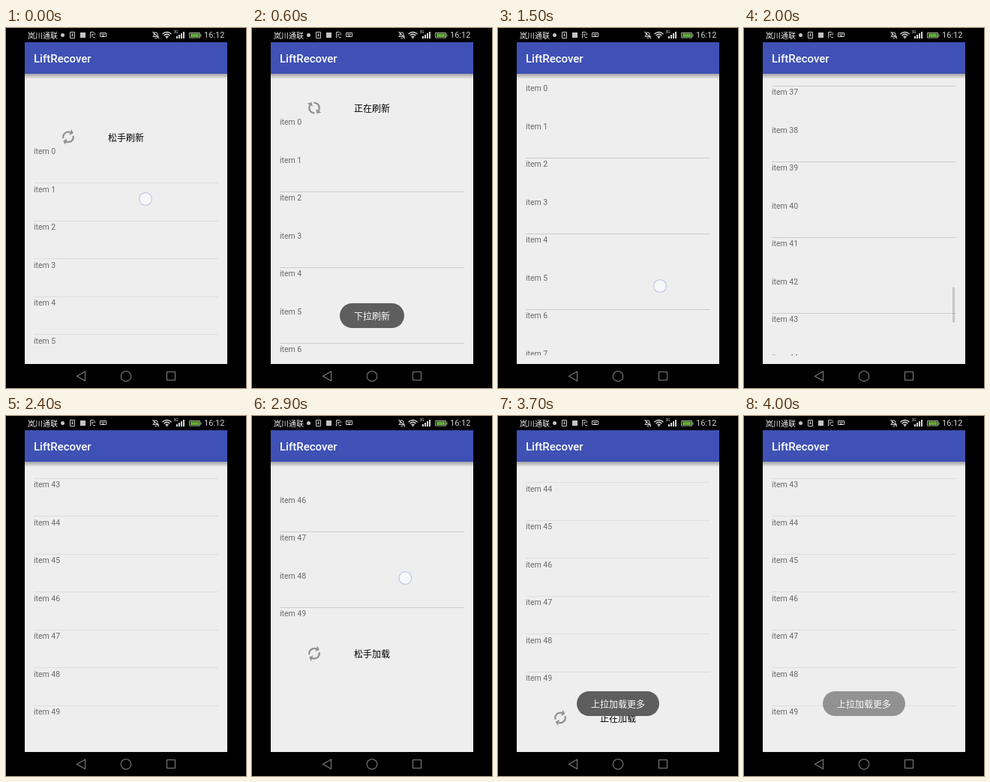
Animation, 320 px wide and 480 px high, one loop 4.1 s. Source, as an HTML page with a canvas:

```html
<!DOCTYPE html>
<html lang="zh-CN">
<head>
<meta charset="utf-8">
<title>Pull list</title>
<style>
html, body { margin: 0; width: 100%; height: 100%; overflow: hidden; background: #000; }
canvas { display: block; }
</style>
</head>
<body>
<canvas id="stage" width="320" height="480"></canvas>
<script>
const ctx = document.getElementById('stage').getContext('2d');
const LOOP = 4100, STEP = 100;
const LATIN = 'Roboto, sans-serif';
const CJK = '"Noto Sans CJK SC", "Noto Sans CJK", sans-serif';

// List geometry in phone pixels; four of them make one stage pixel.
const SCALE = 4, LIST_TOP = 291, LIST_BOTTOM = 1746;
const ROW = 200, DIVIDER = 2, PITCH = ROW + DIVIDER, COUNT = 50;
const MAX_SCROLL = COUNT * PITCH - DIVIDER - (LIST_BOTTOM - LIST_TOP);
const PANEL = 180;

// Tracks are [time, ...values], linear in between.
const END = -MAX_SCROLL;
const shiftTrack = [
  [0, 335], [100, 343], [200, 270], [300, PANEL], [800, PANEL], [900, 0], [1500, 0],
  [1600, -700], [1700, -2450], [1800, -4350], [1900, -6050], [2000, -7454], [2100, -8400],
  [2200, END], [2600, END], [2700, END - 240], [2800, END - 430], [2900, END - 523],
  [3000, END - 529], [3100, END - 300], [3200, END - PANEL], [3700, END - PANEL], [3800, END]
];
const toastTrack = [[0, 0], [100, .57], [200, 1], [700, 1], [800, .64], [900, .2], [1000, 0]];
const barTrack = [[1500, 0], [1600, 1], [2300, 1], [2400, 0]];
const touches = [
  [[0, 186, 228], [100, 186, 230]],
  [[1500, 216, 344], [1600, 221, 200]],
  [[2700, 206, 300], [2800, 205, 240], [2900, 204.3, 216], [3000, 204, 213]]
];

function sample(track, t) {
  const next = track.findIndex(key => key[0] > t);
  if (next === 0) return track[0].slice(1);
  if (next < 0) return track[track.length - 1].slice(1);
  const a = track[next - 1], b = track[next], k = (t - a[0]) / (b[0] - a[0]);
  return a.slice(1).map((v, i) => v + (b[i + 1] - v) * k);
}

function rect(x, y, w, h, color) {
  ctx.fillStyle = color;
  ctx.fillRect(x, y, w, h);
}

function text(str, x, y, font, color, align = 'left', baseline = 'alphabetic') {
  ctx.font = font;
  ctx.fillStyle = color;
  ctx.textAlign = align;
  ctx.textBaseline = baseline;
  ctx.fillText(str, x, y);
}

function circle(x, y, r, fill, stroke, width = 1) {
  ctx.beginPath();
  ctx.arc(x, y, r, 0, 7);
  if (fill) { ctx.fillStyle = fill; ctx.fill(); }
  if (stroke) { ctx.strokeStyle = stroke; ctx.lineWidth = width; ctx.stroke(); }
}

function strokePath(d, color, width = 1) {
  ctx.strokeStyle = color;
  ctx.lineWidth = width;
  ctx.stroke(new Path2D(d));
}

function statusBar() {
  const grey = '#c4c4c4';
  text('岚川通联', 29, 10, '10px ' + CJK, '#f2f2f2', 'left', 'middle');
  circle(75.5, 9.5, 2.5, grey);
  strokePath('M85.5 5.5h6v8h-6zM88.5 7v4M87 9.5l1.5 1.5l1.5-1.5', grey);
  rect(99, 6, 7, 7, grey);
  strokePath('M112.5 13.5v-8h4l2 2v2M114 8.5h3M114 10.5h2M116 12.5h3', grey);
  strokePath('M125.5 6.5h8v5h-8zM127 8.5h5M128 10.5h3', grey);
  strokePath('M196.2 11.5h7l-1.2-1.5v-2.5q-2.3-3.6-4.6 0v2.5zM195.5 5l8.5 9M198.5 13.5h2.5', grey, 1.1);
  strokePath('M208.5 8q6-5 12 0M210.5 10q4-3.5 8 0M212.5 12q2-1.8 4 0', '#e2e2e2', 1.3);
  circle(214.5, 13, 1, '#e2e2e2');
  text('3G', 223.5, 7, '5px ' + LATIN, '#ddd');
  for (let i = 0; i < 4; i++) rect(227 + i * 3, 11 - i * 2, 2, 3 + i * 2, '#d8d8d8');
  strokePath('M244.5 6.5h14v6.5h-14zM260 8.5v3', '#a9b59f');
  rect(246, 7.5, 11.5, 4.5, '#63ad37');
  text('16:12', 264, 13, '11px ' + LATIN, '#cfcfcf');
}

function navBar() {
  const grey = '#7c7c7c';
  strokePath('M105.5 458v12.5l-11-6.2z', grey, 1.1);
  circle(160, 464.3, 6.8, null, grey, 1.1);
  strokePath('M214.5 458.5h11v11h-11z', grey, 1.1);
}

function toolbar() {
  const shadow = ctx.createLinearGradient(0, 61, 0, 68);
  shadow.addColorStop(0, 'rgba(0,0,0,.32)');
  shadow.addColorStop(1, 'rgba(0,0,0,0)');
  rect(25, 61, 270, 7, shadow);
  rect(25, 19, 270, 42, '#3f51b5');
  text('LiftRecover', 37, 45.5, '500 15px ' + LATIN, '#fff');
}

function syncIcon(x, y, degrees) {
  ctx.save();
  ctx.translate(x, y);
  ctx.rotate(degrees * Math.PI / 180);
  ctx.strokeStyle = ctx.fillStyle = '#929292';
  ctx.lineWidth = 2.3;
  for (let half = 0; half < 2; half++) {
    ctx.beginPath();
    ctx.arc(0, 0, 6.8, -2.95, -.65);
    ctx.stroke();
    ctx.fill(new Path2D('M8.2-7.5v6h-6z'));
    ctx.rotate(Math.PI);
  }
  ctx.restore();
}

// The icon starts to spin, and the label changes, when the finger lets go.
function panel(waiting, busy, iconY, elapsed) {
  const spin = Math.max(0, elapsed) * .25;
  syncIcon(83, iconY, spin - 25);
  text(spin ? busy : waiting, 160, iconY + 1, '500 12px ' + CJK, '#000', 'center', 'middle');
}

function list(shift, t) {
  ctx.save();
  ctx.beginPath();
  ctx.rect(25, LIST_TOP / SCALE, 270, (LIST_BOTTOM - LIST_TOP) / SCALE);
  ctx.clip();
  for (let i = 0; i < COUNT; i++) {
    const top = LIST_TOP + i * PITCH + shift;
    if (top < -ROW || top > LIST_BOTTOM) continue;
    text('item ' + i, 37, top / SCALE + 11.6, '10.5px ' + LATIN, '#696969');
    if (i === COUNT - 1) continue;
    // Downscaled dividers look strong, faint or vanish depending on their phase.
    const line = top + ROW, strength = [.5, 1, .5, 0][line % SCALE];
    if (line > 0) rect(37, Math.floor(line / SCALE), 246, 1, `rgba(0,0,0,${.14 * strength})`);
  }
  const over = END - shift;
  if (shift > 0) panel('松手刷新', '正在刷新', 61.6 + shift / SCALE, t - 200);
  if (over > 0) panel('松手加载', '正在加载', 447.4 - over / SCALE, t - 3000);
  ctx.restore();

  const [bar] = sample(barTrack, t);
  const progress = Math.min(1, Math.max(0, -shift / MAX_SCROLL));
  if (bar) rect(278, 73 + progress * 316, 3, 47, `rgba(0,0,0,${.17 * bar})`);
}

function toast(label, time) {
  const [alpha] = sample(toastTrack, time);
  if (!alpha) return;
  const width = label.length * 12 + 38;
  ctx.beginPath();
  ctx.roundRect(160 - width / 2, 367, width, 33, 16.5);
  ctx.fillStyle = `rgba(94,94,94,${alpha})`;
  ctx.fill();
  text(label, 160, 384.3, '12px ' + CJK, '#fafafa', 'center', 'middle');
}

function draw(t) {
  rect(0, 0, 320, 480, '#000');
  rect(25, 61, 270, 387, '#eee');
  list(Math.round(sample(shiftTrack, t)[0]), t);
  toolbar();
  statusBar();
  navBar();
  toast('下拉刷新', t - 300);
  toast('上拉加载更多', t - 3200);
  for (const track of touches) {
    if (t < track[0][0] || t > track[track.length - 1][0]) continue;
    const [x, y] = sample(track, t);
    circle(x, y, 8.4, '#f8f8fb', '#c3c8e8', 1.3);
  }
}

function tick() {
  draw(Math.floor(performance.now() % LOOP / STEP) * STEP);
  requestAnimationFrame(tick);
}
tick();
</script>
</body>
</html>
```
